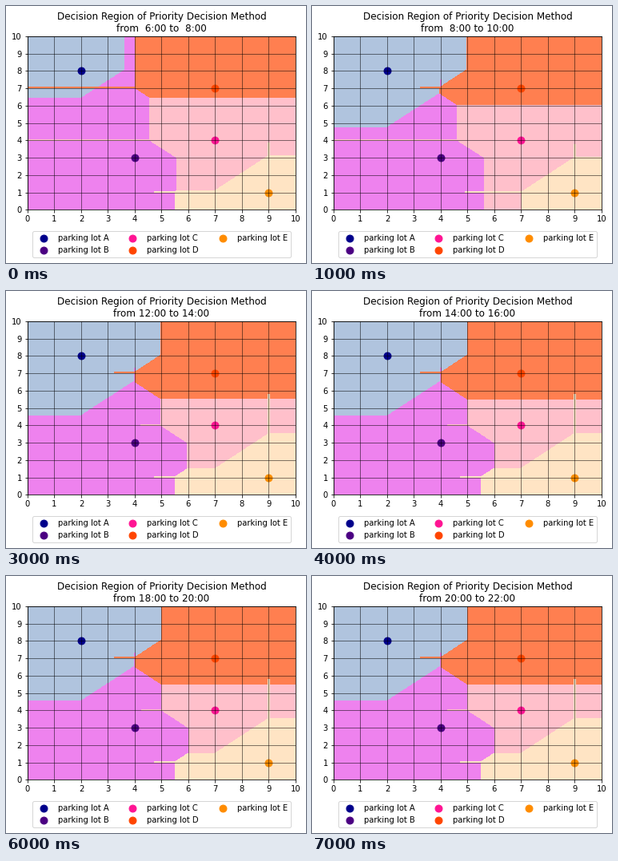
Write a matplotlib script that moves like this. It is 375 px wide and 322 px high and loops after 8000 ms.

```python
import numpy as np
import matplotlib.pyplot as plt
from matplotlib.animation import FuncAnimation
from matplotlib.colors import ListedColormap

W, H, DPI = 375, 322, 72
TURN = 1.5  # extra cost of a route that is not one straight street

LOTS = [  # name, x, y, dot colour, region colour
    ("A", 2, 8, "darkblue", "lightsteelblue"),
    ("B", 4, 3, "indigo", "violet"),
    ("C", 7, 4, "deeppink", "pink"),
    ("D", 7, 7, "orangered", "coral"),
    ("E", 9, 1, "darkorange", "bisque"),
]

# Waiting cost of each lot per two-hour slot; the later slots are all equal.
WAITS = [
    (3.74, 0, -0.85, 1.05, 0),
    (0.40, 0, -0.75, 0.35, 0.32),
    (0.05, 0, -0.20, 0.02, 0),
    (0.01, 0, -0.05, 0, 0),
] + [(0, 0, 0, 0, 0)] * 4

N = 501
axis = np.linspace(0, 10, N)
X, Y = np.meshgrid(axis, axis)


def travel(px, py):
    dx, dy = np.abs(X - px), np.abs(Y - py)
    return dx + dy + TURN * ((dx > 1e-6) & (dy > 1e-6))


TRAVEL = np.array([travel(x, y) for _, x, y, _, _ in LOTS])


def regions(waits):
    """Index of the cheapest lot; later lots spread slightly over earlier ones."""
    cost = TRAVEL + np.array(waits, float)[:, None, None]
    best = np.argmin(np.round(cost, 6), axis=0)
    pad = np.pad(best, ((2, 2), (1, 1)), mode="edge")
    shifts = [pad[j:j + N, i:i + N] for j in range(5) for i in range(3)]
    return np.max(shifts, axis=0)


fig = plt.figure(figsize=(W / DPI, H / DPI), dpi=DPI, facecolor="white")
ax = fig.add_axes([27 / W, (H - 255.3) / H, 334.8 / W, 217.44 / H])

half = axis[1] / 2
image = ax.imshow(
    regions(WAITS[0]), origin="lower", aspect="auto", interpolation="nearest",
    extent=(-half, 10 + half, -half, 10 + half),
    cmap=ListedColormap([lot[4] for lot in LOTS]), vmin=-0.5, vmax=4.5)

for name, x, y, dot, _ in LOTS:
    ax.scatter(x, y, s=80, color=dot, label="parking lot " + name, zorder=1)

ax.set_xlim(0, 10)
ax.set_ylim(0, 10)
ax.set_xticks(range(11))
ax.set_yticks(range(11))
ax.grid(color="black", linewidth=0.5)
ax.legend(loc="upper center", bbox_to_anchor=(0.5, -0.1), ncol=3)
title = ax.set_title("")


def draw(i):
    start = 6 + 2 * i
    image.set_data(regions(WAITS[i]))
    title.set_text("Decision Region of Priority Decision Method\n"
                   f"from {start:2d}:00 to {start + 2:2d}:00")
    return image, title


anim = FuncAnimation(fig, draw, frames=len(WAITS), interval=1000,
                     repeat=True, repeat_delay=0, blit=False)
plt.show()
```
